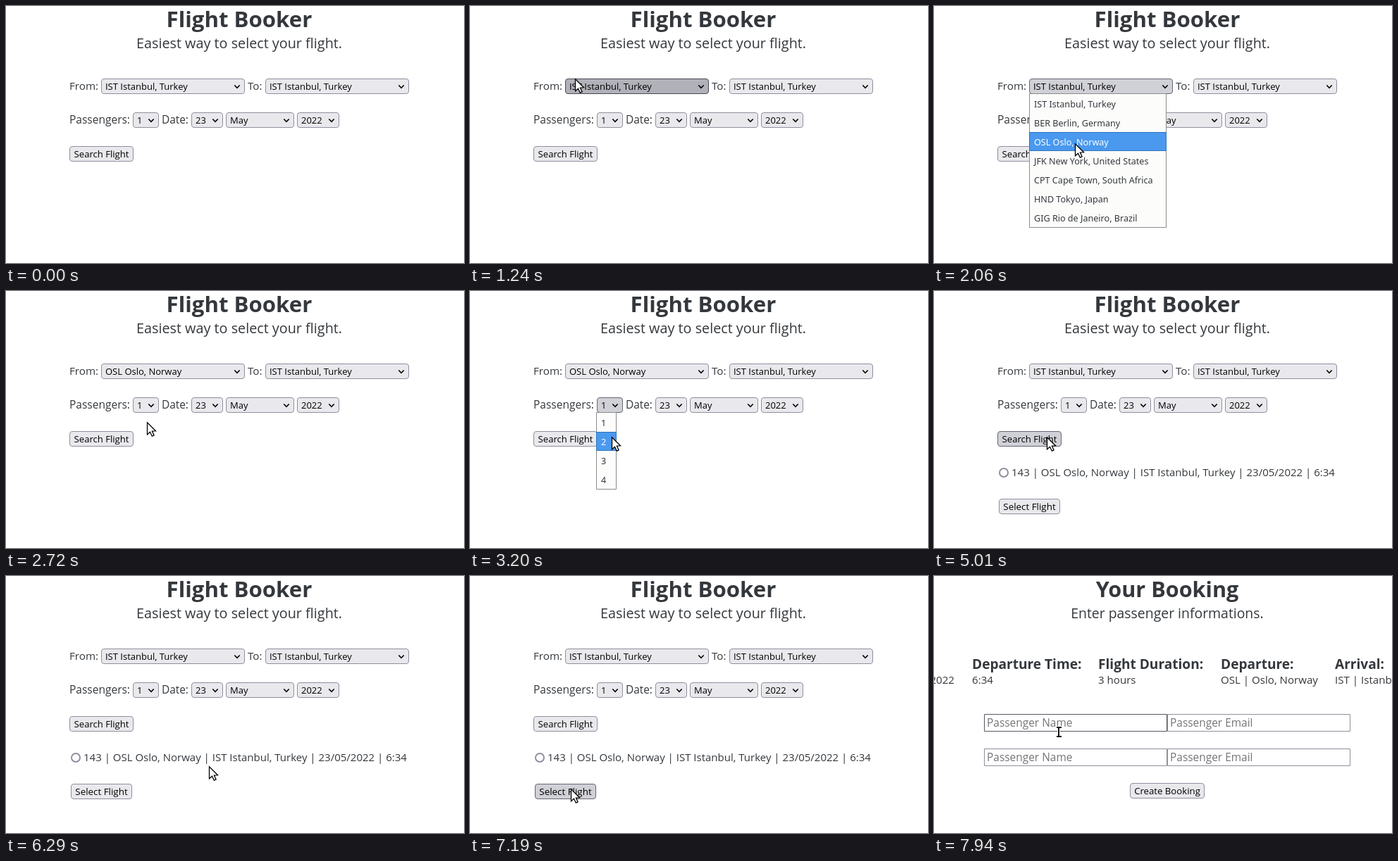
Animation, 650 px wide and 365 px high, one loop 8000 ms. Source, as an HTML page with a canvas:

```html
<!DOCTYPE html>
<html lang="en">
<head>
<meta charset="utf-8">
<title>Flight Booker</title>
<style>
html, body { margin: 0; width: 100%; height: 100%; overflow: hidden; background: #fff; }
canvas { display: block; width: 650px; height: 365px; }
</style>
</head>
<body>
<canvas id="stage" width="650" height="365"></canvas>
<script>
const ctx = document.getElementById('stage').getContext('2d');
const LOOP = 8000, STEP = 60, ROW = 27;
const SANS = '"Open Sans", "Noto Sans", sans-serif';
const LIST = '"Noto Sans", "Open Sans", sans-serif';
const INK = '#34383c';

const CITIES = [
  'IST Istanbul, Turkey', 'BER Berlin, Germany', 'OSL Oslo, Norway',
  'JFK New York, United States', 'CPT Cape Town, South Africa',
  'HND Tokyo, Japan', 'GIG Rio de Janeiro, Brazil'
];
const COUNTS = ['1', '2', '3', '4'];

// Fill and border per control state
const LOOK = {
  normal: ['#e9e9ed', '#8f8f9d'],
  hover: ['#d0d0d7', '#676774'],
  active: ['#b1b1b9', '#484851']
};

// Pointer moves: start time, steps, end x, end y
const START = [88, 103];
const MOVES = [
  [600, 5, 149, 103],
  [1760, 6, 200, 195],
  [2720, 3, 201, 162],
  [3020, 4, 201, 207],
  [4580, 1, 200, 209],
  [4640, 4, 160, 207],
  [5540, 5, 106, 252],
  [5980, 4, 262, 267],
  [6290, 1, 288, 270],
  [6350, 3, 390, 277],
  [6530, 5, 172, 283],
  [6830, 7, 143, 302],
  [7640, 6, 177, 221]
];

const ease = p => p * p * (3 - 2 * p);
const within = (t, a, b) => t >= a && t < b;

function pointerAt(t) {
  let [x, y] = START;
  for (const [start, steps, endX, endY] of MOVES) {
    if (t < start) break;
    const k = Math.min(steps, Math.floor((t - start) / STEP) + 1);
    const p = ease(k / steps);
    x += (endX - x) * p;
    y += (endY - y) * p;
  }
  return { x: Math.round(x), y: Math.round(y), shown: t >= START_TIME };
}
const START_TIME = MOVES[0][0];

const over = (m, x, y, w, h) =>
  m.shown && m.x >= x && m.x <= x + w && m.y >= y && m.y <= y + h;

function text(str, x, y, size, { color = INK, weight = 400, align = 'left', family = SANS } = {}) {
  ctx.font = `${weight} ${size}px ${family}`;
  ctx.fillStyle = color;
  ctx.textAlign = align;
  ctx.fillText(str, x, y);
}

function frame(x, y, w, h, fill, border, radius = 0) {
  ctx.beginPath();
  ctx.roundRect(x + 0.5, y + 0.5, w - 1, h - 1, radius);
  ctx.fillStyle = fill;
  ctx.fill();
  ctx.strokeStyle = border;
  ctx.lineWidth = 1;
  ctx.stroke();
}

function control(x, y, w, state) {
  frame(x, y, w, 22, ...LOOK[state], 3.5);
}

function select(label, x, y, w, state = 'normal') {
  control(x, y, w, state);
  text(label, x + 6, y + 16, 13, { color: '#000' });
  const cx = x + w - 11, cy = y + 11.5;
  ctx.beginPath();
  ctx.moveTo(cx - 3.7, cy - 2);
  ctx.lineTo(cx, cy + 1.8);
  ctx.lineTo(cx + 3.7, cy - 2);
  ctx.strokeStyle = '#000';
  ctx.lineWidth = 1.6;
  ctx.stroke();
}

function button(label, x, y, w, size, mouse, pressed) {
  const state = pressed ? 'active' : over(mouse, x, y, w, 22) ? 'hover' : 'normal';
  control(x, y, w, state);
  text(label, x + w / 2, y + 16, size, { color: '#000', align: 'center' });
}

function dropdown(items, x, y, w, mouse) {
  const row = Math.floor((mouse.y - y) / ROW);
  const picked = row >= 0 && row < items.length ? row : 0;
  frame(x, y - 1, w, items.length * ROW + 2, '#fcfcfb', '#8c8c8c');
  items.forEach((item, i) => {
    const top = y + i * ROW;
    if (i === picked) frame(x, top, w, ROW, '#4a99ee', '#2f75bd');
    text(item, x + 7, top + 19, 12.6, { color: i === picked ? '#fff' : INK, family: LIST });
  });
}

function heading(title, subtitle, titleSize, subSize) {
  text(title, 331, 30, titleSize, { weight: 700, align: 'center' });
  text(subtitle, 331, 60, subSize, { align: 'center' });
}

function searchPage(t, mouse) {
  const loaded = t >= 5010;
  const cityOpen = within(t, 1300, 2390);
  const countOpen = within(t, 2960, 3860);
  const from = within(t, 2390, 5010) ? CITIES[2] : CITIES[0];
  const count = within(t, 3860, 5010) ? '2' : '1';

  let fromState = 'normal', countState = 'normal';
  if (cityOpen || over(mouse, 135, 103, 204, 22)) fromState = 'hover';
  if (within(t, 1240, 1300)) fromState = 'active';
  if (within(t, 2960, 3920) || over(mouse, 180, 151, 37, 22)) countState = 'hover';
  if (within(t, 2900, 2960)) countState = 'active';

  heading('Flight Booker', 'Easiest way to select your flight.', 31.2, 19.8);
  text('From:', 90, 119, 15.2);
  select(from, 135, 103, 204, fromState);
  text('To:', 343, 119, 15.2);
  select(CITIES[0], 368, 103, 204);

  text('Passengers:', 90, 167, 15.5);
  select(count, 180, 151, 37, countState);
  text('Date:', 221, 167, 15.4);
  select('23', 263, 151, 45);
  select('May', 312, 151, 97);
  select('2022', 413, 151, 60);

  button('Search Flight', 90, 199, 91, 13.1, mouse, within(t, 4880, 5010));

  if (loaded) {
    ctx.beginPath();
    ctx.arc(99, 258, 6, 0, Math.PI * 2);
    ctx.strokeStyle = over(mouse, 92, 251, 14, 14) ? '#676774' : '#8f8f9d';
    ctx.lineWidth = 2;
    ctx.stroke();
    text('143 | OSL Oslo, Norway | IST Istanbul, Turkey | 23/05/2022 | 6:34', 110, 263, 15);
    button('Select Flight', 92, 295, 87, 13.4, mouse, within(t, 7250, 7380));
  }
  if (cityOpen) dropdown(CITIES, 135, 125, 195, mouse);
  if (countOpen) dropdown(COUNTS, 179, 173, 29, mouse);
}

const FIELDS = [
  ['Passenger Name', 71, 196], ['Passenger Email', 331, 196],
  ['Passenger Name', 71, 245], ['Passenger Email', 331, 245]
];
const inField = (m, [, x, y]) => over(m, x, y, 259, 25);

function bookingPage(mouse) {
  heading('Your Booking', 'Enter passenger informations.', 30.6, 19.4);
  text('23/05/2022', 29, 153, 15.1, { align: 'right' });
  const columns = [
    [54, 'Departure Time:', '6:34'],
    [233, 'Flight Duration:', '3 hours'],
    [407, 'Departure:', 'OSL | Oslo, Norway'],
    [569, 'Arrival:', 'IST | Istanbul, Turkey']
  ];
  for (const [x, name, value] of columns) {
    text(name, x, 132, 19.1, { weight: 700 });
    text(value, x, 153, 15.1);
  }
  for (const field of FIELDS) {
    const [label, x, y] = field;
    frame(x, y, 260, 25, '#fff', inField(mouse, field) ? '#575763' : '#8f8f9d');
    text(label, x + 4, y + 18, 15.45, { color: '#757575' });
  }
  button('Create Booking', 278, 294, 106, 13.2, mouse, false);
}

const ARROW = [[0, 0], [0, 17], [4, 13.4], [6.8, 19.4], [9.6, 18.1], [6.9, 12.3], [12, 12]];

function arrow({ x, y }) {
  ctx.beginPath();
  ARROW.forEach(([dx, dy]) => ctx.lineTo(x + 0.5 + dx, y + 0.8 + dy));
  ctx.closePath();
  ctx.fillStyle = '#fff';
  ctx.fill();
  ctx.strokeStyle = '#000';
  ctx.lineWidth = 1.3;
  ctx.stroke();
}

function beam({ x, y }) {
  const bars = [[-3, -7, 7, 2], [-1, -7, 2, 15], [-3, 6, 7, 2]];
  ctx.fillStyle = '#fff';
  for (const [dx, dy, w, h] of bars) ctx.fillRect(x + dx - 1, y + dy - 1, w + 2, h + 2);
  ctx.fillStyle = '#111';
  for (const [dx, dy, w, h] of bars) ctx.fillRect(x + dx, y + dy, w, h);
}

function draw(now) {
  const t = now % LOOP;
  const mouse = pointerAt(t);
  const booking = t >= 7380;
  ctx.fillStyle = '#fff';
  ctx.fillRect(0, 0, 650, 365);
  if (booking) bookingPage(mouse); else searchPage(t, mouse);
  if (mouse.shown) {
    if (booking && FIELDS.some(f => inField(mouse, f))) beam(mouse);
    else arrow(mouse);
  }
}

const origin = performance.now();
function tick() {
  draw(performance.now() - origin);
  requestAnimationFrame(tick);
}
tick();
</script>
</body>
</html>
```
